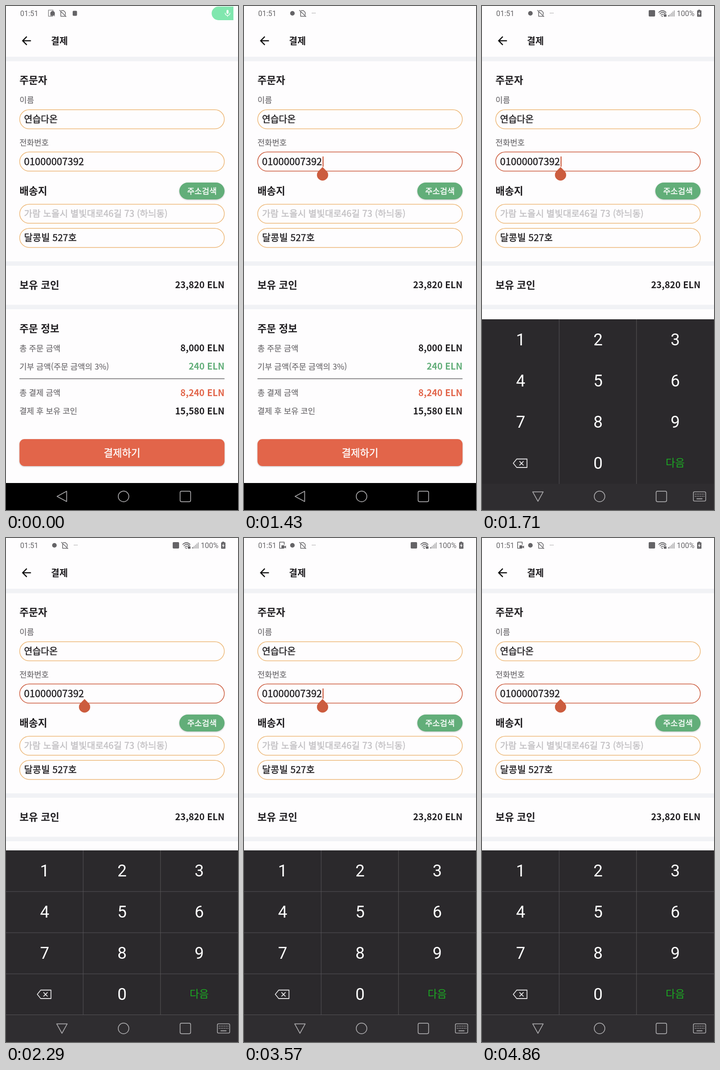
These frames come from a looping animation (508x1102 px, 5010 ms). An HTML page:

```html
<!DOCTYPE html>
<html lang="ko">
<head>
<meta charset="utf-8">
<title>결제</title>
<style>
  html, body { margin: 0; width: 100%; height: 100%; overflow: hidden; background: #fefdfe; }
  svg { display: block; width: 100vw; height: 100vh; }
  text { font-family: "Noto Sans CJK KR", "Noto Sans CJK", sans-serif; }
  .sys { font-family: Roboto, sans-serif; }
  .line { fill: none; stroke-linecap: round; stroke-linejoin: round; }
  .raised { filter: drop-shadow(0 1.5px 1.5px rgba(0, 0, 0, .24)); }
</style>
</head>
<body>
<svg id="stage" viewBox="0 0 508 1102" preserveAspectRatio="none"></svg>
<script>
const LOOP = 5010;
const RATE = 7 / 1000; // screen updates per ms
const INK = '#201e21', SOFT = '#6c6a6d', GREEN = '#62ae79', RED = '#e2654a', FOCUS = '#cc5c3e', AMBER = '#edb878';

const rect = (x, y, w, h, fill, r = 0, extra = '') =>
  `<rect x="${x}" y="${y}" width="${w}" height="${h}" rx="${r}" fill="${fill}" ${extra}/>`;
const path = (d, color, width, extra = '') =>
  `<path class="line" d="${d}" stroke="${color}" stroke-width="${width}" ${extra}/>`;
const group = (id, body, extra = '') => `<g id="${id}" ${extra}>${body}</g>`;

// y is the vertical centre of the glyphs; thicken adds a hairline for in-between weights
function text(x, y, str, size, { fill = INK, weight = 400, thicken = 0, anchor = 'start', cls = '' } = {}) {
  const baseline = y + size * (cls === 'sys' ? 0.356 : 0.375);
  return `<text class="${cls}" x="${x}" y="${baseline}" font-size="${size}" font-weight="${weight}" ` +
    `fill="${fill}" stroke="${fill}" stroke-width="${thicken}" text-anchor="${anchor}">${str}</text>`;
}
const heading = (y, str) => text(29.5, y, str, 22, { weight: 700 });
const label = (y, str) => text(29.5, y, str, 17.4, { fill: SOFT, thicken: .2 });
const amount = (y, str, fill = INK) => text(478.5, y, str, 19.7, { fill, weight: 700, anchor: 'end' });
const band = y => rect(0, y, 508, 9.7, '#f1f2f5');

function field(y, str, size = 20, fill = INK, id = '') {
  const box = rect(30, y, 448, 41.7, 'none', 20.8, `id="${id}" stroke="${AMBER}" stroke-width="1.5"`);
  return box + text(39.5, y + 20.3, str, size, { fill, thicken: .45 });
}

function form() {
  const arrow = '<path transform="translate(29.8 61.1) scale(1.24)" fill="#111" ' +
    'd="M20 11H7.83l5.59-5.59L12 4l-8 8 8 8 1.41-1.41L7.83 13H20z"/>';
  return arrow + text(98.5, 76, '결제', 20, { weight: 700 }) +
    band(111) + heading(162, '주문자') +
    label(205, '이름') + field(226.8, '연습다온') +
    label(298, '전화번호') + field(319.3, '01000007392', 21.5, INK, 'phone') +
    heading(404, '배송지') +
    rect(379.5, 386, 99, 37, GREEN, 18.5, 'class="raised"') +
    text(429, 404, '주소검색', 17.6, { fill: '#fff', thicken: .4, anchor: 'middle' }) +
    field(433.4, '가람 노을시 별빛대로46길 73 (하늬동)', 19.7, '#c2c0c3') +
    field(486.2, '달콩빌 527호', 20.5) +
    band(558.3) + heading(610, '보유 코인') + amount(610, '23,820 ELN') + band(653.3) +
    group('cursor', rect(172, 329, 2.2, 22.5, FOCUS)) +
    group('handle', `<path d="M172 352l8.7 8.7a12.3 12.3 0 1 1-17.4 0z" fill="${FOCUS}"/>`);
}

function order() {
  return heading(705, '주문 정보') +
    label(748, '총 주문 금액') + amount(748, '8,000 ELN') +
    label(788, '기부 금액(주문 금액의 3%)') + amount(788, '240 ELN', GREEN) +
    rect(29.5, 814, 449, 2, '#8d8b8e') +
    label(845.5, '총 결제 금액') + amount(845.5, '8,240 ELN', RED) +
    label(885.5, '결제 후 보유 코인') + amount(885.5, '15,580 ELN') +
    rect(29.5, 947, 449, 59, RED, 11, 'class="raised"') +
    text(254, 976.5, '결제하기', 21.8, { fill: '#fff', thicken: .45, anchor: 'middle' });
}

function statusBar() {
  const gray = '#656467';
  const sysText = (x, str) => text(x, 16.3, str, 16, { fill: gray, cls: 'sys' });
  const record = path('M85 22.5H78V9H88V14', gray, 1.6) +
    rect(82, 16, 6.5, 7, gray, 1) + `<path d="M88 19.5L92 16.5V23z" fill="${gray}"/>`;
  const usb = `<circle cx="106" cy="16" r="5" fill="${gray}"/>`;
  const noSim = path('M125 10H130L134 14V19M134 22.5H124V13M121.5 9.5L135.5 23', gray, 1.5);
  const dots = path('M149.5 15.5h.1M152.5 15.5h.1M155.5 15.5h.1', gray, 1.4);
  const wifi = path('M387 14Q395 6.5 403 14M389.5 17Q395 11.5 400.5 16M392 20Q395 17 397 18.5', gray, 1.7) +
    `<circle cx="394.5" cy="22.5" r="1.3" fill="${gray}"/>` + rect(398, 18.5, 6, 5, gray, 1) +
    path('M399.5 18.5V17a1.5 1.5 0 0 1 3 0V18.5', gray, 1);
  const bars = [0, 1, 2, 3, 4].map(i =>
    rect(408 + i * 3, 20 - i * 2.6, 1.8, 3 + i * 2.6, i < 1 ? gray : '#a9a8aa')).join('');
  const battery = rect(473.5, 8, 4, 2, gray) + rect(471, 9.5, 9.5, 14, gray, 1.2) +
    '<path d="M476.8 11.5L473 17.3H475.4L474.6 21.5L478.5 15.7H476z" fill="#fff"/>';
  const mic = rect(453.9, 8.5, 4.4, 8.8, '#fff', 2.2) +
    path('M450.8 15.5a5.3 5.3 0 0 0 10.6 0M456.1 20.8V23', '#fff', 1.4);
  return sysText(31, '01:51') + group('record', record) + group('icons', usb + noSim) + group('dots', dots) +
    group('badge', rect(146, 10.5, 9.5, 11, gray, 2)) +
    group('signals', rect(365, 9, 14, 14, gray, 2) + wifi + bars + sysText(426.5, '100%') + battery) +
    `<g clip-path="url(#edge)">${group('pill', rect(421.3, 1.3, 69.5, 29.6, '#3ddc84', 14.8) + mic)}</g>`;
}

function keypad() {
  const columns = [84.5, 254, 423], rows = [727, 817, 907, 997], rule = '#575558';
  const digit = (x, y, n) => text(x, y, n, 36, { fill: '#fff', anchor: 'middle', cls: 'sys' });
  const rowLines = [772.5, 862.5, 952.5, 1042].map(y => rect(0, y, 508, 1, rule)).join('');
  let out = rect(0, 683, 508, 360, '#2b292c') + rect(0, 1042.5, 508, 100, '#2f2d30') + group('rowLines', rowLines);
  for (const x of [168.5, 337.8]) out += rect(x, 683, 1, 360, rule);
  for (let n = 1; n <= 9; n++) out += digit(columns[(n - 1) % 3], rows[Math.floor((n - 1) / 3)], n);
  return out + digit(columns[1], rows[3], 0) +
    text(columns[2], 997, '다음', 22.6, { fill: '#1bad22', anchor: 'middle' }) +
    path('M76 988.5H98.5V1007H76L68.5 997.8zM82.5 993.8l8 8M90.5 993.8l-8 8', '#e4e3e5', 1.8);
}

function navigation() {
  const c = '#a9a8aa';
  const keys = rect(462.8, 1062.3, 27, 20.2, 'none', 2.5, `stroke="${c}" stroke-width="1.6"`) +
    path('M467 1067.3H486M467 1072H486', c, 2, 'stroke-dasharray=".2 3.6"') + path('M470.5 1077.5H482', c, 1.8);
  return group('back', path('M111.8 1072.3L132.8 1061V1083.6z', c, 1.7)) +
    group('down', path('M111 1062.3H134L122.5 1083z', c, 1.7)) +
    `<circle cx="257.4" cy="1072.3" r="11.6" fill="none" stroke="${c}" stroke-width="1.7"/>` +
    rect(381.3, 1060.8, 23, 23, 'none', 3, `stroke="${c}" stroke-width="1.7"`) +
    group('keys', keys);
}

document.getElementById('stage').innerHTML =
  '<defs><clipPath id="edge"><rect x="400" width="98" height="40"/></clipPath></defs>' +
  rect(0, 0, 508, 1102, '#fefdfe') + form() + group('order', order()) + statusBar() +
  rect(0, 1043, 508, 59, '#000') + group('keypad', keypad()) + navigation();

const part = id => document.getElementById(id);
const fade = (id, value) => part(id).setAttribute('opacity', value);
const move = (id, x, y = 0) => part(id).setAttribute('transform', `translate(${x} ${y})`);

// Linear track through [ms, value] steps
function track(steps, t) {
  const next = steps.findIndex(s => s[0] > t);
  if (next === 0) return steps[0][1];
  if (next < 0) return steps[steps.length - 1][1];
  const [t0, a] = steps[next - 1], [t1, b] = steps[next];
  return a + (b - a) * (t - t0) / (t1 - t0);
}

const tracks = {
  pillX: [[0, 29], [140, 9], [290, 0], [1140, 0], [1430, 29]],
  pillFade: [[0, .65], [290, 1], [1140, 1], [1430, 0]],
  settle: [[0, 1], [140, .4], [430, 0]],
  keypadY: [[1430, 300], [1570, 236], [1710, 2], [1860, 0]],
  keypadFade: [[1430, 0], [1570, .33], [1710, 1]],
  rowLines: [[1710, 0], [1860, 1]]
};

function draw(ms) {
  const tick = Math.min(34, Math.floor((ms + 5) * RATE));
  const t = Math.round(tick / RATE / 10) * 10;
  const at = name => track(tracks[name], t);
  const focused = t >= 1400, resized = t >= 1500, open = t >= 1650;
  const settle = at('settle');

  move('pill', at('pillX'));
  fade('pill', at('pillFade'));
  fade('signals', +open);
  move('icons', -4 * settle);
  move('record', 15 * settle);
  fade('record', t >= 3500 ? 1 : .7 * settle);
  fade('badge', settle);
  fade('dots', 1 - settle);

  part('phone').setAttribute('stroke', focused ? FOCUS : AMBER);
  fade('handle', +focused);
  fade('cursor', +(focused && (t - 1360) % 1000 < 490));
  fade('order', +!resized);

  move('keypad', 0, at('keypadY'));
  fade('keypad', at('keypadFade'));
  fade('rowLines', at('rowLines'));
  fade('keys', +resized);
  fade('back', +!open);
  fade('down', +open);
}

const start = performance.now();
function loop() {
  draw((performance.now() - start) % LOOP);
  requestAnimationFrame(loop);
}
loop();
</script>
</body>
</html>
```
